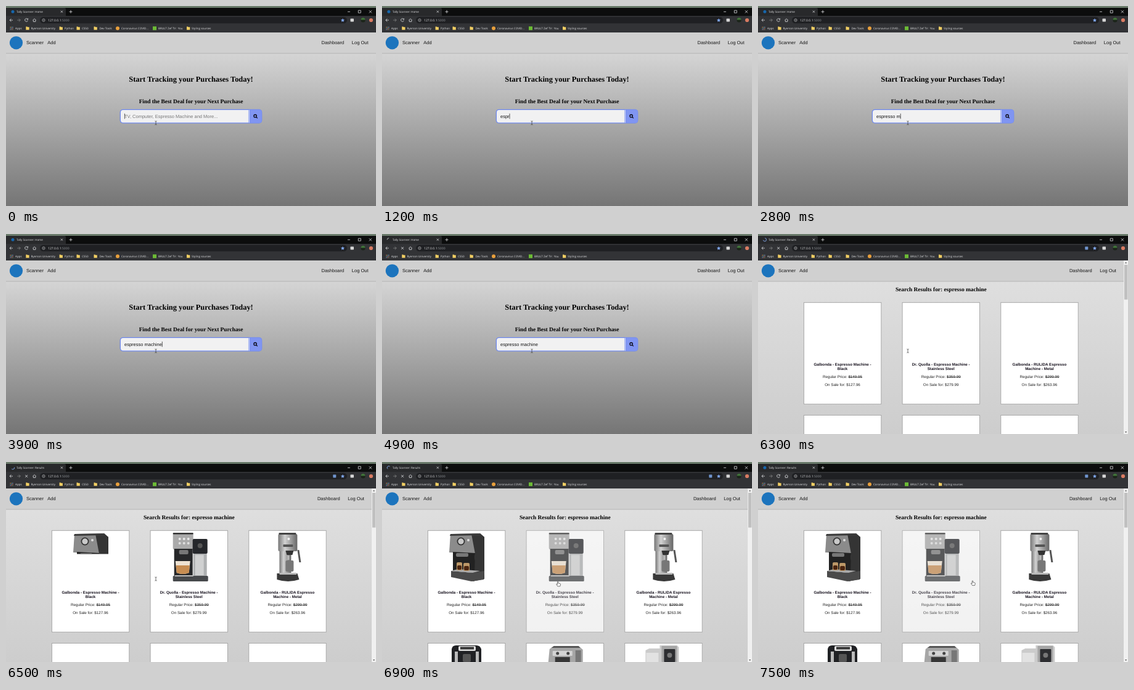
Write an HTML page that moves like this. It is 600 px wide and 325 px high and loops after 7600 ms.

```html
<!DOCTYPE html>
<html lang="en">
<head>
<meta charset="utf-8">
<title>Tally Scanner</title>
<style>
  html, body { margin: 0; width: 100%; height: 100%; overflow: hidden; background: #000; }
  svg { display: block; width: 600px; height: 325px; }
  text { white-space: pre; text-rendering: geometricPrecision; }
  .ui { font: 4.55px "Open Sans", sans-serif; fill: #e4e5e7; }
  .url { font-size: 5.1px; }
  .sans { font: 7.5px "Liberation Sans", Arial, sans-serif; fill: #151515; }
  .serif { font: bold 9.375px "Liberation Serif", "Times New Roman", serif; text-anchor: middle; }
  .card { font: 6.25px "Liberation Sans", Arial, sans-serif; fill: #222; text-anchor: middle; }
  .card .name { font-weight: bold; fill: #15101c; }
  .line { fill: none; stroke: #dcdde0; stroke-width: .8; }
</style>
</head>
<body>
<svg viewBox="0 0 600 325">
  <defs>
    <linearGradient id="homeBg" x2="0" y2="1"><stop stop-color="#e2e2e2"/><stop offset="1" stop-color="#757575"/></linearGradient>
    <linearGradient id="resultsBg" x2="0" y2="1"><stop stop-color="#e1e1e1"/><stop offset="1" stop-color="#cdcdcd"/></linearGradient>
    <linearGradient id="steel"><stop stop-color="#777"/><stop offset=".35" stop-color="#d2d2d2"/><stop offset="1" stop-color="#666"/></linearGradient>
    <clipPath id="reveal"><rect id="revealBox" x="74" y="111" width="126" height="39"/></clipPath>
  </defs>

  <!-- browser window -->
  <rect width="600" height="43" fill="#323336"/>
  <rect width="600" height="16" fill="#0c0d0d"/>
  <rect width="600" height="3" fill="#6b7c6c"/>
  <path d="M0 16V3H95q2 0 2 2V16z" fill="#28292b"/>
  <rect x="55" y="17.8" width="498" height="10.4" rx="5.2" fill="#1f2023"/>
  <circle id="favicon" cx="11" cy="9.3" r="2.5" fill="#1667ad"/>
  <circle id="spinner" cx="11" cy="9.3" r="2.6" fill="none" stroke-width=".9"/>
  <text id="title" class="ui" x="17" y="11"></text>
  <g class="line">
    <path d="M88.8 7.6l3.2 3.2m0-3.2l-3.2 3.2M105 6.8v5m-2.5-2.5h5M554 9.3h4M571.3 7.2h4v4h-4zM588.8 7.2l4.2 4.2m0-4.2l-4.2 4.2"/>
    <path d="M11 23H6m2.4-2.4L6 23l2.4 2.4"/>
    <path d="M18.3 23h5m-2.4-2.4l2.4 2.4-2.4 2.4" stroke="#888"/>
    <path id="reload" d="M35.3 21.6a2.5 2.5 0 1 0 .2 2M35.6 20.2v1.8h-2"/>
    <path id="stop" d="M31.2 21l4 4m0-4l-4 4"/>
    <path d="M43.4 23.1l2.7-2.4 2.7 2.4M44.3 22.6v2.8h3.6v-2.8"/>
    <circle cx="61" cy="23" r="2.2" stroke-width=".6"/><path d="M61 22.6v1.5m0-2.5v.5" stroke-width=".6"/>
  </g>
  <text class="ui url" x="68" y="24.9">127.0.0.1<tspan fill="#92969b">:5000</tspan></text>
  <path d="M546 20.1l.9 2 2.2.2-1.7 1.4.6 2.2-2-1.2-2 1.2.6-2.2-1.7-1.4 2.2-.2z" fill="#82aaf4"/>
  <rect id="translate" x="530.3" y="20.5" width="5" height="5" rx=".7" fill="#6f94ce"/>
  <rect x="558.5" y="20.5" width="5.5" height="5" rx=".8" fill="#d7d7d7"/>
  <circle cx="579" cy="23" r="3.6" fill="#1b2419"/><path d="M575.5 22.5a3.5 3.5 0 0 1 7 0z" fill="#41743a"/>
  <circle cx="592" cy="23" r="3.1" fill="#d97b62"/>
  <g id="bookmarks"></g>

  <g id="home">
    <rect y="43" width="600" height="282" fill="url(#homeBg)"/>
    <text class="serif" x="300" y="122.7" style="font-size:12.4px">Start Tracking your Purchases Today!</text>
    <text class="serif" x="300" y="157.8">Find the Best Deal for your Next Purchase</text>
    <rect x="184.7" y="167.8" width="230.6" height="23" rx="5" fill="#6f89ee"/>
    <path d="M190 169H393.3V189.6H190q-4 0-4-4V173q0-4 4-4z" fill="#f1f1f2"/>
    <path d="M394.4 168.8v21" stroke="#f4f4fb" stroke-width=".8"/>
    <path d="M395.3 168.6H411q3.7 0 3.7 4v13.4q0 4-3.7 4H395.3z" fill="#8095f2"/>
    <g fill="none" stroke="#0b0b18" stroke-width="1.3"><circle cx="404.1" cy="178.7" r="2.2"/><path d="M405.8 180.4l2 2"/></g>
    <text id="query" class="sans" x="192" y="181.7"></text>
    <path id="caret" d="M.4 174.8v8.6" stroke="#111" stroke-width=".7"/>
  </g>

  <g id="results">
    <rect y="43" width="600" height="282" fill="url(#resultsBg)"/>
    <text class="serif" x="296.8" y="93">Search Results for: espresso machine</text>
    <g id="cards"></g>
    <rect x="593" y="43" width="7" height="282" fill="#f0f0f0"/>
    <rect x="594" y="50" width="5.4" height="56.5" fill="#c0c0c0"/>
    <path d="M595 47.5l1.6-2 1.6 2zM595 321l1.6 2 1.6-2z" fill="#555"/>
  </g>

  <!-- site navigation -->
  <rect id="navBar" y="43" height="34" fill="#d0d0d0"/>
  <path id="navEdge" stroke="#aaa" stroke-width=".8"/>
  <circle cx="16.5" cy="59.8" r="10.6" fill="#1c74bd"/>
  <g class="sans">
    <text x="33" y="62.2">Scanner</text><text x="67.3" y="62.2">Add</text>
    <g id="account"><text x="511.5" y="62.2">Dashboard</text><text x="560.8" y="62.2">Log Out</text></g>
  </g>

  <path id="beam" d="M-1.6-3q1.6 0 1.6.7q0-.7 1.6-.7M0-2.5v5M-1.6 3q1.6 0 1.6-.7q0 .7 1.6.7" transform="translate(243 190)" fill="none" stroke="#333" stroke-width=".7"/>
  <path id="hand" d="M-.8.8q.8-1.2 1.5 0V3l3 .7q.7.3.6 1.2L3.5 8H-.4L-2.4 5.2q-.3-1 .6-.9l1 .8z" fill="#fff" stroke="#222" stroke-width=".6"/>
</svg>
<script>
const LOOP = 7600, QUERY = 'espresso machine', PLACEHOLDER = 'TV, Computer, Espresso Machine and More...';
const KEY_TIMES = [400, 500, 900, 1200, 1500, 1800, 2000, 2100, 2300, 2800, 3000, 3300, 3400, 3500, 3700, 3900];
const SUBMIT = 4100, COMMIT = 6200, PAINT = 6300, IMAGES = 6500, HOVER = 6700, LOADED = 7100;

const $ = id => document.getElementById(id);
const show = (id, on) => $(id).style.display = on ? '' : 'none';
const rect = (x, y, w, h, fill, r = 0) => `<rect x="${x}" y="${y}" width="${w}" height="${h}" rx="${r}" fill="${fill}"/>`;
const path = (d, fill) => `<path d="${d}" fill="${fill}"/>`;
const disc = (x, y, r, fill) => `<circle cx="${x}" cy="${y}" r="${r}" fill="${fill}"/>`;

const folder = x => path(`M${x} 33.6h2l.7.7h2.6v4.4h-5.3z`, '#f2cf63');
const bookmarks = [
  [15, 'Apps', [0, 1, 2].map(i => [0, 1, 2].map(j =>
    rect(6.6 + i * 1.9, 33.8 + j * 1.9, 1.2, 1.2, ['#e06a55', '#63a56a', '#6590dd'][(i + j) % 3])).join('')).join('')],
  [40.5, 'Ryerson University', folder(32.3)],
  [95, 'Python', folder(86.6)],
  [123, 'CS50', folder(114.5)],
  [151.5, 'Dev Tools', folder(142.5)],
  [187, 'Coronavirus COVID...', disc(181, 36.2, 3, '#e9a03c')],
  [247, 'BRULT Zef TV : You', rect(238, 33.2, 6, 6, '#6cbb35')],
  [301, 'Styling sources', folder(293)],
];
$('bookmarks').innerHTML = bookmarks.map(([x, label, icon]) => `${icon}<text class="ui" x="${x}" y="37.9">${label}</text>`).join('');

// Coffee machines, each drawn around its card's centre line (x = 0)
const machines = [
  path('M-26 117L22 116 29 122 28 149 -28 147z', '#8b8b8b') + path('M8 117L22 116 29 122 29 190 10 194 14 149z', '#343434')
    + path('M-26 117L22 116 24 119-27 120z', '#3b3b3b') + disc(-9, 129, 6.5, '#333') + disc(-9, 129, 4.7, '#c9c9c9')
    + disc(3, 127, 2, '#ddd') + path('M-22 146L14 148 13 180-22 177z', '#222') + rect(-17, 148, 20, 6, '#777', 2)
    + path('M-25 177L10 180 29 177 28 191 8 194-25 187z', '#4a4a4a') + path('M-25 177L10 180 22 177-14 174z', '#aaa')
    + rect(-16, 163, 9, 13, '#bc9868', 2) + rect(-5, 164, 10, 13, '#bc9868', 2)
    + rect(-15, 168, 7, 7, '#4b2510', 2) + rect(-4, 169, 8, 7, '#4b2510', 2),
  rect(-26, 115, 33, 27, '#aaa', 2) + rect(-26, 115, 33, 2.5, '#333', 1) + rect(-24, 141, 30, 47, '#27282a')
    + [0, 1, 2].map(i => disc(-15 + i * 7, 125, 2, '#e9e9e9') + disc(-15 + i * 7, 132, 2, '#dfdfdf')).join('')
    + rect(6, 125, 24, 24, '#25272b', 2) + disc(18, 136, 4, '#555')
    + rect(7, 149, 22, 37, '#aeb0b1') + rect(10, 151, 14, 33, '#d0d1d1') + rect(-16, 143, 15, 7, '#777', 2)
    + path('M-22 161H2L0 180q-10 4-20 0z', '#eee2d2') + path('M-21 168H1L0 180q-10 4-20 0z', '#c78d52')
    + rect(-26, 185, 57, 9, '#47494c', 1.5) + rect(-23, 184, 30, 2, '#bbb'),
  rect(-15, 117, 31, 28, 'url(#steel)', 2) + rect(-14, 115, 28, 3, '#444', 1) + rect(-13, 145, 19, 37, 'url(#steel)')
    + disc(2, 125, 2, '#f4f4f4') + rect(-7, 134, 16, 4, '#555', 1) + path('M-3 144H10L8 151H-1z', '#333')
    + rect(0, 152, 3, 7, '#bbb') + path('M16 143h3l3 20h-3z', '#555') + rect(-3, 160, 13, 18, '#777', 2)
    + path('M-17 181H16L19 191Q1 197-17 191z', '#393939') + rect(-13, 180, 28, 3, '#bbb', 1),
  path('M-24 304q1-6 7-6H16q6 0 8 6V325H-24z', '#202124') + rect(-13, 299, 28, 8, '#ddd', 2)
    + rect(-10, 300.5, 22, 4, '#343434') + path('M-19 308H-14V325H-19zM15 308h5v17h-5z', '#bbb') + rect(-6, 312, 13, 13, '#555', 2),
  path('M-25 304L-18 299H22l7 6V325H-27z', '#a6a6a6') + path('M-18 299H22l3 3H-22z', '#555') + rect(-20, 307, 32, 8, '#d4d4d4', 1)
    + disc(-12, 311, 2.5, '#444') + disc(5, 311, 2.5, '#444') + rect(-16, 317, 24, 8, '#363636') + rect(17, 306, 9, 19, '#777'),
  path('M-29 306L-23 303H-6V298H22L25 301V325H-29z', '#cbcbcb') + rect(-3, 299, 25, 26, '#a6a6a6', 1)
    + rect(1, 304, 18, 21, '#2d2e31', 1) + disc(10, 314, 4, '#777') + rect(-28, 310, 20, 15, '#e2e2e2'),
];
const products = [
  ['Galbonda - Espresso Machine -', 'Black', '$149.95', '$127.96'],
  ['Dr. Quolla - Espresso Machine -', 'Stainless Steel', '$359.99', '$279.99'],
  ['Galbonda - RULIDA Espresso', 'Machine - Metal', '$299.99', '$263.96'],
];
const frame = y => `<rect x="-62.6" y="${y}" width="125.4" height="165" fill="#fff" stroke="#a3a3a3" stroke-width=".9"/>`;
$('cards').innerHTML = products.map(([name, kind, regular, sale], i) => `
  <g ${i ? '' : 'clip-path="none"'} transform="translate(${137 + i * 159.7})">
    <g class="card" id="card${i}">${frame(111.3)}<g id="pic${i}">${machines[i]}</g>
      <text class="name" y="213.7">${name}</text><text class="name" y="220.6">${kind}</text>
      <text y="234.2">Regular Price: <tspan text-decoration="line-through">${regular}</tspan></text>
      <text y="247.4">On Sale for: ${sale}</text></g>
    ${frame(294.5)}<g id="pic${i + 3}">${machines[i + 3]}</g>
  </g>`).join('');
$('pic0').setAttribute('clip-path', 'url(#reveal)');
$('revealBox').setAttribute('x', -63);

function drawSpinner(t) {
  const loading = t >= COMMIT, turn = loading ? (t - COMMIT) * .36 - 120 : 180 - (t - 4900) * .36;
  const length = loading ? 8 + 4 * Math.cos((t - COMMIT) / 150) : 4.2;
  const spinner = $('spinner');
  spinner.setAttribute('stroke', loading ? '#86abef' : '#c5c6c8');
  spinner.setAttribute('stroke-dasharray', `${length} 20`);
  spinner.setAttribute('transform', `rotate(${turn} 11 9.3)`);
}

function drawHand(t) {
  const k = Math.min(1, (t - HOVER + 100) / 600);
  let x = 243 + 84.5 * k, y = 190 + 8 * k;
  if (t >= 7300) x = 330.5;
  if (t >= 7500) [x, y] = [348, 192.6];
  $('hand').setAttribute('transform', `translate(${x} ${y})`);
}

function draw(now) {
  const t = Math.floor(now % LOOP / 100) * 100;
  const results = t >= PAINT, busy = t >= SUBMIT && t < LOADED, hover = t >= HOVER;

  $('title').textContent = 'Tally Scanner: ' + (t >= COMMIT ? 'Results' : 'Home');
  show('home', !results);
  show('results', results);
  show('translate', results);
  show('spinner', busy);
  show('stop', busy);
  show('favicon', !busy);
  show('reload', !busy);
  drawSpinner(t);

  const width = results ? 593 : 600;
  $('navBar').setAttribute('width', width);
  $('navEdge').setAttribute('d', `M0 77h${width}`);
  $('account').setAttribute('transform', `translate(${results ? -6.6 : 0})`);

  const typed = QUERY.slice(0, KEY_TIMES.filter(k => k <= t).length);
  $('query').textContent = typed || PLACEHOLDER;
  $('query').style.fill = typed ? '#151515' : '#777';
  if (!results) {
    const caretX = 192 + (typed ? $('query').getComputedTextLength() : 0);
    $('caret').setAttribute('transform', `translate(${caretX})`);
  }
  show('caret', t < 100 || t >= 400 && t < 4400 || t >= 5000 && t < 5500);

  [IMAGES, IMAGES, IMAGES, 6700, 6800, 6900].forEach((at, i) => show('pic' + i, t >= at));
  $('revealBox').setAttribute('height', t > IMAGES ? 90 : 38.5);
  $('card1').style.opacity = hover ? .72 : 1;
  show('beam', !hover);
  show('hand', hover);
  drawHand(t);
}

const start = performance.now();
function tick() {
  draw(performance.now() - start);
  requestAnimationFrame(tick);
}
tick();
</script>
</body>
</html>
```
